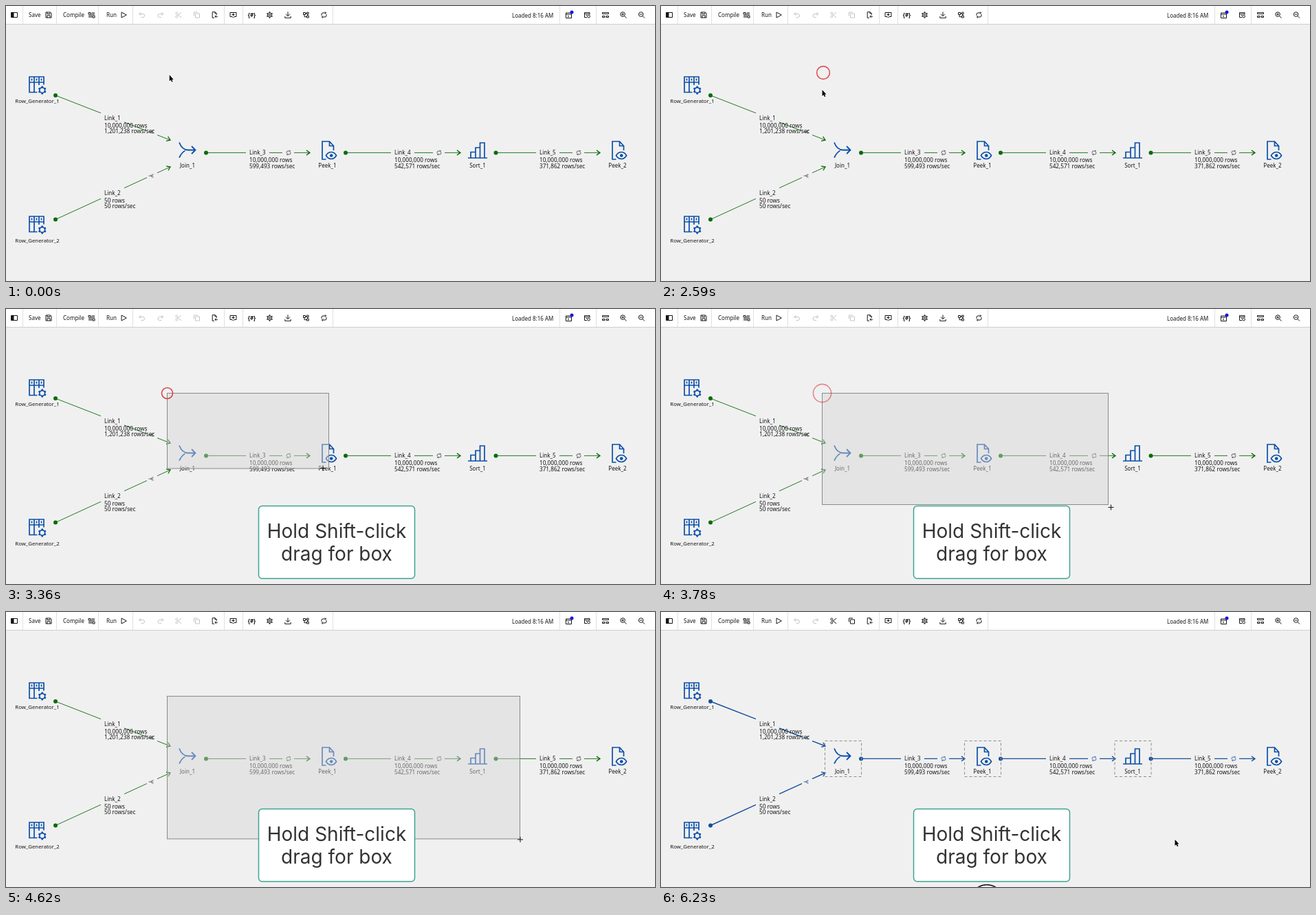
Write an HTML page with a canvas that moves like this. It is 944 px wide and 400 px high and loops after 6300 ms.

```html
<!DOCTYPE html>
<html lang="en">
<head>
<meta charset="utf-8">
<title>Box selection</title>
<style>
html, body { margin: 0; width: 100%; height: 100%; overflow: hidden; background: #f0f0f0; }
canvas { display: block; }
</style>
</head>
<body>
<canvas id="stage" width="944" height="400"></canvas>
<script>
const ctx = document.getElementById('stage').getContext('2d');
const LOOP = 6300, STEP = 70;
const DRAG = 2660, RELEASE = 5040;
const INK = '#161616', PALE = '#c4c4c4', BLUE = '#0b4fa8', GREEN = '#0b6b0b', NAVY = '#164f9a';
const SMALL = '8px "Noto Sans", sans-serif';
const DATA = '8.2px "Noto Sans", sans-serif';

const clamp = v => Math.max(0, Math.min(1, v));

function text(s, x, y, font = SMALL, align = 'left', color = INK) {
  ctx.font = font;
  ctx.textAlign = align;
  ctx.textBaseline = 'alphabetic';
  ctx.fillStyle = color;
  ctx.fillText(s, x, y);
}

function rect(x, y, w, h, color) {
  ctx.fillStyle = color;
  ctx.fillRect(x, y, w, h);
}

function disc(x, y, r, color) {
  ctx.beginPath();
  ctx.arc(x, y, r, 0, Math.PI * 2);
  ctx.fillStyle = color;
  ctx.fill();
}

function ring(x, y, r, color, width) {
  ctx.beginPath();
  ctx.arc(x, y, r, 0, Math.PI * 2);
  ctx.strokeStyle = color;
  ctx.lineWidth = width;
  ctx.stroke();
}

// Draws an SVG path around (x, y): d is stroked, solid is filled.
function icon(x, y, d, color = INK, width = 1, solid = '') {
  ctx.save();
  ctx.translate(x, y);
  ctx.lineWidth = width;
  ctx.strokeStyle = ctx.fillStyle = color;
  ctx.stroke(new Path2D(d));
  if (solid) ctx.fill(new Path2D(solid));
  ctx.restore();
}

function gear(x, y, r, color, width) {
  ctx.strokeStyle = color;
  ctx.lineWidth = width * 1.5;
  ctx.beginPath();
  for (let i = 0; i < 6; i++) {
    const a = Math.PI * (i / 3 + 1 / 6), c = Math.cos(a), s = Math.sin(a);
    ctx.moveTo(x + c * r * .72, y + s * r * .72);
    ctx.lineTo(x + c * r * 1.1, y + s * r * 1.1);
  }
  ctx.stroke();
  ring(x, y, r * .72, color, width);
}

// Smooth path through keys [time, x, y], at rest on both ends.
function track(keys, t) {
  const n = keys.length - 1;
  if (t <= keys[0][0]) return keys[0].slice(1);
  if (t >= keys[n][0]) return keys[n].slice(1);
  const i = keys.findIndex(k => k[0] > t) - 1;
  const a = keys[i], b = keys[i + 1], span = b[0] - a[0], u = (t - a[0]) / span;
  const slope = (j, c) => j === 0 || j === n ? 0
    : (keys[j + 1][c] - keys[j - 1][c]) / (keys[j + 1][0] - keys[j - 1][0]);
  return [1, 2].map(c => {
    const u2 = u * u, u3 = u2 * u;
    return a[c] * (2 * u3 - 3 * u2 + 1) + b[c] * (3 * u2 - 2 * u3)
      + span * (slope(i, c) * (u3 - 2 * u2 + u) + slope(i + 1, c) * (u3 - u2));
  });
}

const REFRESH = 'M-3.5 1V-1A2 2 0 0 1-1.5-3H3M1.5-4.6L3.1-3 1.5-1.4M3.5-1V1A2 2 0 0 1 1.5 3H-3M-1.5 4.6L-3.1 3-1.5 1.4';

function toolbar(selected) {
  rect(0, 0, 944, 26, '#fff');
  rect(0, 26, 944, 1, '#cfcfcf');
  for (const x of [24, 73, 134, 184, 317, 344, 475, 805, 858]) rect(x, 0, 1, 26, '#e0e0e0');
  text('Save', 33, 16);
  text('Compile', 83, 16);
  text('Run', 146, 16);
  text('Loaded 8:16 AM', 736, 17);
  const edit = selected ? INK : PALE;
  icon(12, 13, 'M-4.5-3.5h9v7h-9z', INK, 1, 'M-4.5-3.5h4v7h-4z');
  icon(62, 13, 'M-4-4H2.5L4-2.5V4H-4zM-2-4v2.5h4V-4M-2 4V.7h4V4');
  icon(124.5, 13, 'M-4.5-3.5h3v2.5h-3zM0-3h4.5M-1.5-1H4.5M-4.5 1H1M-4.5 3H1M1.5 1h3v3h-3z');
  icon(171, 13, 'M-3-4L4.2 0-3 4z');
  icon(198, 13, 'M-1.5 3.5H1a2.5 2.5 0 0 0 0-5h-5M-1.7-4L-4.2-1.5-1.7 1', PALE);
  icon(224.5, 13, 'M1.5 3.5H-1a2.5 2.5 0 0 1 0-5h5M1.7-4L4.2-1.5 1.7 1', PALE);
  icon(251, 13, 'M4-3.8L-1.5.8M4 3.8L-1.5-.8M-4.2-2.5a1.5 1.5 0 1 0 3 0a1.5 1.5 0 1 0-3 0M-4.2 2.5a1.5 1.5 0 1 0 3 0a1.5 1.5 0 1 0-3 0', edit);
  icon(277.5, 13, 'M-2-2h6v6h-6zM-4 1.5V-4H1.5', edit);
  icon(303.5, 13, 'M3-.5V-2L.5-4.3H-3.3V4.2H-.5M.5-4.3V-2H3M4.3 2.3H.5M2.3.4L.4 2.3l1.9 1.9');
  icon(330.5, 13, 'M-4.5-3.5h9v6H1.5L0 4-1.5 2.5h-3zM0-2.5v4M-2-.5h4');
  text('{#}', 357.5, 16, 'bold 8px "Noto Sans", sans-serif', 'center');
  gear(383.5, 13, 4.3, INK, 1);
  ring(383.5, 13, 1.3, INK, 1);
  icon(410, 13, 'M0-4.5V1.6M-3-1.3L0 1.7 3-1.3M-4.2 2v2.3h8.4V2');
  icon(436.5, 13, 'M-4-3.5h3v3h-3zM1-3.8h2.6v2.6H1zM-1-2h2M-2.5-.5v3.2H1M2.3-1.2v2.4M1 1.2h2.8V4H1z');
  icon(462.5, 13, REFRESH);
  icon(818.5, 13.5, 'M-4-3.5h8v7.5h-8zM-4-1.5h8M-1.5.3L0 1.5-1.5 2.7');
  disc(823, 9, 2.5, '#1717e0');
  icon(845.5, 13, 'M3.5-.5V-3.5H-4v7H-.5M-4-1.5h7.500M-2 .5h2');
  ring(847.6, 15.2, 1.8, INK, 1);
  icon(872, 13, 'M-4.5-3.5h9v2h-9zM-4.5 1.5H-1v2h-3.5zM1 1.5h3.5v2H1z');
  for (const x of [898, 924.5]) {
    icon(x, 13, 'M1.6 1.6L4.5 4.5M-2.7-.9H.9' + (x < 900 ? 'M-.9-2.7V.9' : ''));
    ring(x - .9, 12.1, 3.3, INK, 1);
  }
}

function generator(y, name) {
  icon(33, y, 'M1 1H22V9H1zM8 1V9M15 1V9M4.500 3.500V6.500M11.500 3.500V6.500M18.500 3.500V6.500M1 9V23.500H8V9M8 23.500H12.500M15 9V13M22 9V12.500', BLUE, 1.7);
  gear(52.7, y + 20.5, 5.4, BLUE, 1.7);
  text(name, 45.5, y + 39, '7.8px "Noto Sans", sans-serif', 'center');
}

function peek(x, name) {
  icon(x, 196, 'M-2 27H-7.5V1H3L9 7.5V14M3 1V7.5H9M-2 21.5C0 17.8 3 16.5 5.8 16.5S11 17.8 13 21.5C11 25 8.5 26.5 5.8 26.5S0 25-2 21.5z', BLUE, 1.7);
  disc(x + 5.7, 217.5, 2.3, BLUE);
  text(name, x, 235, SMALL, 'center');
}

function nodes() {
  generator(102, 'Row_Generator_1');
  generator(305, 'Row_Generator_2');
  icon(252, 209.5, 'M0-11C3-3 7 0 13 0H23M0 11C3 5 5 2.5 8.5 1M18-5.5L23.5 0 18 5.5', BLUE, 1.8);
  text('Join_1', 264, 235, SMALL, 'center');
  peek(467.5, 'Peek_1');
  icon(672, 198, 'M0 23H28M4 23V14.5H11V8H17.5V1H24V23M11 14V23M17.5 8V23', BLUE, 1.7);
  text('Sort_1', 686, 235, SMALL, 'center');
  peek(889.5, 'Peek_2');
}

// A straight link from a to b, drawn only over the given x spans.
function wire(a, b, spans, color, width) {
  const slope = (b[1] - a[1]) / (b[0] - a[0]);
  const yAt = x => a[1] + (x - a[0]) * slope;
  ctx.strokeStyle = color;
  ctx.lineWidth = width;
  ctx.beginPath();
  for (const [from, to] of spans) {
    ctx.moveTo(from, yAt(from));
    ctx.lineTo(to, yAt(to));
  }
  ctx.stroke();
  ctx.save();
  ctx.translate(...b);
  ctx.rotate(Math.atan(slope));
  ctx.lineWidth = 1.3;
  ctx.stroke(new Path2D('M-5-3.5L0 0-5 3.5'));
  ctx.restore();
  disc(...a, 3, color);
}

function slantedLink(a, b, color, width, mark, name, y, rows, rate) {
  wire(a, b, [[a[0], 138], [172, 205], [220, b[0]]], color, width);
  icon(211, mark, 'M-3.5 0H0M3.5-2H1.5L-.5 0 1.5 2H3.5M0 0H3', color === NAVY ? NAVY : '#444', .8);
  text(name, 143, y);
  text(rows, 143, y + 10.7, DATA);
  text(rate, 143, y + 19.2, DATA);
}

function flatLink(x0, label, mark, x1, name, rate, color, width) {
  wire([x0, 213.4], [x1, 213.4], [[x0, label - 5], [label + 29, mark - 9], [mark + 8, x1]], color, width);
  ctx.save();
  ctx.translate(mark, 213.4);
  ctx.scale(.8, .8);
  icon(0, 0, REFRESH, color === NAVY ? NAVY : '#333', 1);
  ctx.restore();
  text(name, label, 216);
  text('10,000,000 rows', label, 227, DATA);
  text(rate, label, 235.5, DATA);
}

function links(selected) {
  const color = selected ? NAVY : GREEN, width = selected ? 1.4 : .9;
  slantedLink([72, 130], [239, 195], color, width, 183, 'Link_1', 166, '10,000,000 rows', '1,201,238 rows/sec');
  slantedLink([72, 310.5], [239, 234], color, width, 247, 'Link_2', 275, '50 rows', '50 rows/sec');
  flatLink(291, 354, 411, 442, 'Link_3', '599,493 rows/sec', color, width);
  flatLink(494, 565, 630, 661, 'Link_4', '542,571 rows/sec', color, width);
  flatLink(712.5, 776, 833, 864, 'Link_5', '371,862 rows/sec', color, width);
}

function frames() {
  ctx.save();
  ctx.setLineDash([4, 3]);
  ctx.strokeStyle = '#8d8d8d';
  ctx.lineWidth = 1;
  for (const x of [238, 441, 659.5]) ctx.strokeRect(x + .5, 187.5, 53, 52);
  ctx.restore();
}

function clickRing(x, y, start, t) {
  const p = (t - start) / 1500;
  if (p <= 0 || p >= 1) return;
  ctx.globalAlpha = 1 - p ** 2.2;
  ring(x, y, 18 * p, '#d8262c', 1.6);
  ctx.globalAlpha = 1;
}

const CORNER = [[DRAG, 235, 122.5], [3360, 469.5, 232], [3780, 650.5, 284.5], [4550, 747.5, 330]];
const CROSS = [[DRAG, 235, 122.5], [3360, 461, 231.5], [3780, 654.5, 288.5], [4550, 748, 331]];
const POINTER = [[1610, 237.7, 100.3], [1750, 236, 97], [2030, 236, 97], [2520, 234.5, 122]];

function marquee(t) {
  const [x, y] = track(CORNER, t);
  rect(234.5, 122.5, x - 234.5, y - 122.5, 'rgba(212,212,212,.45)');
  ctx.strokeStyle = '#8a8a8a';
  ctx.lineWidth = 1;
  ctx.strokeRect(234.5, 122.5, x - 234.5, y - 122.5);
}

function pointer(t) {
  if (t >= DRAG && t < RELEASE) {
    const [x, y] = track(CROSS, t);
    icon(x, y, 'M-4 0H4M0-4V4', INK, 1);
    return;
  }
  const [x, y] = t < DRAG ? track(POINTER, t) : [747.5, 331];
  const shape = 'M0 0V9L2 7.2 3.5 10.3 4.9 9.6 3.5 6.6H6z';
  icon(x, y, shape, '#fff', 1.4);
  icon(x, y, '', '#000', 1, shape);
}

function caption(t) {
  ctx.globalAlpha = clamp((t - DRAG) / 350);
  ctx.beginPath();
  ctx.roundRect(367.5, 286.5, 227, 105.5, 5);
  ctx.fillStyle = '#fff';
  ctx.fill();
  ctx.strokeStyle = '#3fa48f';
  ctx.lineWidth = 1.5;
  ctx.stroke();
  const font = '28px Inter, sans-serif';
  text('Hold Shift-click', 481, 332.5, font, 'center', '#333');
  text('drag for box', 481, 366, font, 'center', '#333');
  ctx.globalAlpha = 1;
}

function badge(t) {
  const top = 400 - (t - 6125) * 4 / 105;
  disc(474, top + 25, 25, '#fff');
  ring(474, top + 25, 24.3, '#111', 1.5);
}

function draw(t) {
  const selected = t >= RELEASE;
  rect(0, 0, 944, 400, '#f0f0f0');
  toolbar(selected);
  links(selected);
  nodes();
  if (selected) frames();
  if (t >= DRAG && !selected) marquee(t);
  clickRing(236, 97, 1810, t);
  clickRing(234.5, 122.5, 2690, t);
  pointer(t);
  if (t > DRAG) caption(t);
  if (t >= 6160) badge(t);
}

const begin = performance.now();
function tick() {
  const t = (performance.now() - begin) % LOOP;
  draw(Math.floor(t / STEP) * STEP);
  requestAnimationFrame(tick);
}
tick();
</script>
</body>
</html>
```
